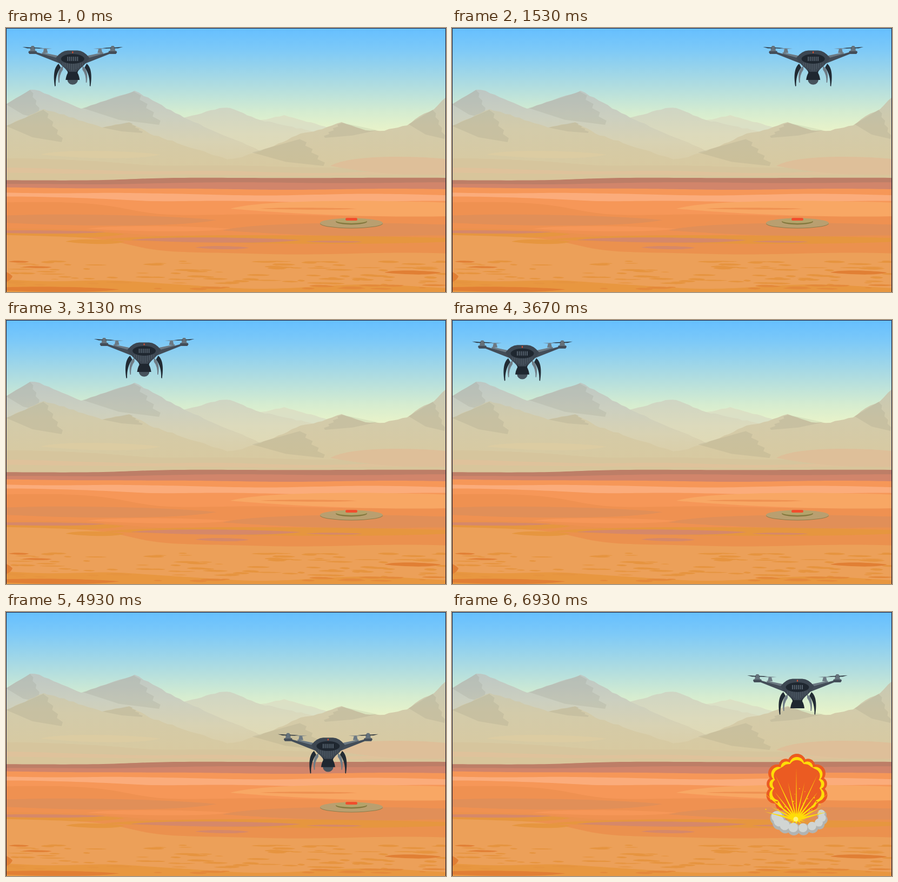
Recreate the animation shown at these times as an HTML page. Size 814 px wide and 488 px high, loop 8 s.

```html
<!DOCTYPE html>
<html lang="en">
<head>
<meta charset="utf-8">
<title>Drone over the desert</title>
<style>
html, body { margin: 0; width: 100%; height: 100%; overflow: hidden; }
svg { display: block; width: 814px; height: 488px; }
</style>
</head>
<body>
<svg viewBox="0 0 814 488">
  <defs>
    <linearGradient id="sky" gradientUnits="userSpaceOnUse" x1="0" y1="0" x2="0" y2="195">
      <stop offset="0" stop-color="#65bfff"/><stop offset=".2" stop-color="#7cc9f8"/>
      <stop offset=".5" stop-color="#a9dae3"/><stop offset=".8" stop-color="#d5ecd0"/>
      <stop offset="1" stop-color="#ecf4c8"/>
    </linearGradient>
    <linearGradient id="haze" gradientUnits="userSpaceOnUse" x1="0" y1="114" x2="0" y2="275">
      <stop offset="0" stop-color="#bdc7c4"/><stop offset=".3" stop-color="#cbcfc0"/>
      <stop offset=".6" stop-color="#d8d2b3"/><stop offset="1" stop-color="#dccb9f"/>
    </linearGradient>
    <linearGradient id="far" gradientUnits="userSpaceOnUse" x1="0" y1="147" x2="0" y2="245">
      <stop offset="0" stop-color="#ced5c4"/><stop offset=".5" stop-color="#dcdabc"/>
      <stop offset="1" stop-color="#e2d9b1"/>
    </linearGradient>
    <linearGradient id="near" gradientUnits="userSpaceOnUse" x1="0" y1="128" x2="0" y2="275">
      <stop offset="0" stop-color="#c6c8b4"/><stop offset=".4" stop-color="#d3cbaa"/>
      <stop offset="1" stop-color="#d9c99e"/>
    </linearGradient>
    <g id="side">
      <path fill="#6c7983" d="M-57 45 L-28 51 V56 L-56 48Z M-55 46 L-53 38 H-48 L-46 46Z M-62 38 L-51 37.4 L-38 38 L-51 39Z"/>
      <path fill="#6f7c86" d="M-18 70 Q-30 78 -26 101 L-24.5 101 Q-25 86 -18 77Z"/>
      <path fill="#434d58" d="M-81 42.5 H-67 L-66 45 L-30 55 L-20 67 L-68 48 H-80 L-82 45Z"/>
      <path fill="#64717b" d="M-79 43 L-78 36 L-76 33 H-72 L-70 36 L-69 43Z"/>
      <path fill="#29323b" d="M-93 35 L-77 36 V37.4 H-84Z M-71 36 L-55 37 L-62 38 L-71 37.4Z"/>
      <path fill="#222b34" d="M-26 66 C-35 73 -36 90 -33 108 L-31.5 107 C-32 94 -29 82 -22 73Z"/>
    </g>
  </defs>
  <g id="scene"></g>
  <g id="mine">
    <ellipse cx="639" cy="361.5" rx="58" ry="9" fill="#8b7c4c"/>
    <ellipse cx="639" cy="360.5" rx="58" ry="9" fill="#b99f70"/>
    <ellipse cx="639" cy="358" rx="29" ry="5.4" fill="#84783e"/>
    <ellipse cx="639" cy="356" rx="29" ry="5" fill="#b4a36a"/>
    <rect x="628" y="351" width="22" height="5" rx="2.5" fill="#f04e2d"/>
  </g>
  <g id="ball">
    <circle cy="95" r="9.8" fill="#46525c"/>
  </g>
  <g id="drone">
    <use href="#side"/><use href="#side" transform="scale(-1 1)"/>
    <path fill="#3c4651" d="M-31 55 Q-21 42 -9 41.5 H9 Q21 42 31 55 Q25 66 14 75 L8 82 H-8 L-14 75 Q-25 66 -31 55Z"/>
    <path id="ribs" stroke="#535f6a" fill="none"/>
    <ellipse cy="57" rx="21.5" ry="9" fill="#1f2730"/>
    <path id="grill" stroke="#54606c" stroke-width="2" fill="none"/>
    <path fill="#1f2730" d="M-10 77 L-7 81 H7 L10 77 L9 83 Q12 88 13 96 H-13 Q-12 88 -9 83Z"/>
    <rect x="-1" y="43.5" width="2" height="3" fill="#e5502f"/>
  </g>
  <g id="boom"></g>
  <path d="M.5 488 V.5 H813.5 V488" fill="none" stroke="#1c1730"/>
</svg>
<script>
const $ = id => document.getElementById(id);
const WIDTH = 814, HEIGHT = 488;

let seed = 7;
const random = () => (seed = seed * 16807 % 2147483647) / 2147483647;
const between = (a, b) => a + (b - a) * random();
const range = (n, make) => Array.from({ length: n }, (_, i) => make(i));

function draw(parent, tag, attrs) {
  const el = document.createElementNS('http://www.w3.org/2000/svg', tag);
  for (const name in attrs) el.setAttribute(name, attrs[name]);
  $(parent).append(el);
}
const poly = (parent, fill, points) => draw(parent, 'polygon', { fill, points: points.join(' ') });
const circle = (fill, cx, cy, r) => draw('boom', 'circle', { fill, cx, cy, r });

// Mountain range through a few peaks and saddles, with slightly rough slopes
function ridge(fill, ...peaks) {
  const points = [];
  peaks.slice(1).forEach(([x1, y1], i) => {
    const [x0, y0] = peaks[i], steps = Math.ceil((x1 - x0) / 9);
    for (let k = 0; k < steps; k++) {
      const s = k / steps, rough = k ? between(-1.2, 1.2) : 0;
      points.push([x0 + (x1 - x0) * s, y0 + (y1 - y0) * s + rough]);
    }
  });
  const end = peaks[peaks.length - 1];
  poly('scene', fill, [...points, end, [end[0], 280], [peaks[0][0], 280]]);
}

// Shaded face: one straight slope from the peak, one jagged edge on the other side
function face(x, y, w, h) {
  const edge = range(9, i => [x + w * (.5 * i / 8 + (i % 2 ? .06 : -.03)), y + 2 * h * i / 8]);
  poly('scene', 'rgba(115,115,100,.12)', [[x - w, y + h], [x, y], ...edge, [x - w * .3, y + h * 1.7]]);
}

// Ground from a wavy upper edge down; the edge changes level left of the middle
function layer(fill, left, right, wave = 1) {
  const phase = between(0, 6);
  const edge = range(83, i => {
    const x = i * 10, step = (1 + Math.tanh((x - 230) / 65)) / 2;
    return [x, left + (right - left) * step + wave * Math.sin(x / 62 + phase)];
  });
  poly('scene', fill, [...edge, [WIDTH + 6, HEIGHT], [0, HEIGHT]]);
}

// Flat patch tapering to both ends
const streak = (fill, x, y, w, h) => draw('scene', 'path', {
  fill, d: `M${x} ${y}c${w * .15} ${-h} ${w * .8} ${-h * .6} ${w} 0c${-w * .2} ${h} ${-w * .7} ${h * .6} ${-w} 0Z`
});

function drawMountains() {
  draw('scene', 'rect', { width: WIDTH, height: HEIGHT, fill: 'url(#sky)' });
  ridge('#dbe0c5', [440, 178], [515, 161], [590, 182], [660, 215]);
  ridge('url(#far)', [300, 176], [328, 166], [395, 148], [415, 148], [470, 170], [580, 194], [640, 230]);
  ridge('url(#haze)', [0, 141], [45, 114], [62, 116], [139, 149], [238, 116], [330, 166], [420, 205], [520, 250]);
  face(45, 114, 45, 27);
  face(238, 117, 96, 31);
  ridge('url(#near)', [0, 181], [70, 150], [90, 155], [178, 184], [228, 174], [265, 195], [410, 243], [450, 280]);
  face(70, 151, 70, 30);
  face(228, 174, 50, 10);
  ridge('url(#near)', [390, 246], [436, 239], [512, 211], [545, 195], [585, 187], [621, 174], [665, 189],
    [700, 190], [742, 180], [765, 163], [792, 150], [814, 128]);
  face(621, 175, -66, 14);
  face(790, 151, 45, 27);
  face(545, 205, 90, 25);
  streak('#dccca2', 65, 234, 220, 11);
  layer('#d6c59d', 243, 256, 2);
  layer('#dfc29b', 260, 266, 2);
  streak('#debf99', 600, 255, 300, 28);
  layer('#d8c59b', 268, 272);
}

function drawDesert() {
  const deep = '#ef9151', brown = '#e18f58', bright = '#f69758', ochre = '#e6963f', violet = '#d68869', rust = '#e17f34';
  layer('#bd7e67', 281.500, 277, .3);
  layer('#d1856b', 289, 286, .8);
  layer(bright, 295, 298);
  layer('#fbac7b', 304, 308, 1.5);
  layer(bright, 313, 321, 1.5);
  layer(deep, 323, 346, 1.5);
  streak('#f8a764', 415, 334, 560, 24);
  streak(deep, 470, 334, 180, 3);
  streak(brown, -90, 355, 480, 17);
  streak(brown, 400, 374, 600, 22);
  streak(bright, 150, 371, 265, 8);
  layer('#eb914e', 372, 385, 1.5);
  streak(ochre, -90, 381, 310, 11);
  streak(ochre, 180, 391, 700, 13);
  streak(violet, -60, 377, 245, 5);
  streak(violet, 230, 392, 315, 8);
  streak(violet, 350, 406, 100, 5);
  streak(violet, 555, 395, 105, 3);
  layer('#eca059', 384, 417, 1.5);
  streak(ochre, 110, 395, 110, 7);
  layer('#e89740', 464, 478, 4);

  for (let i = 0; i < 110; i++) {
    const depth = random();
    streak(depth > .85 ? '#e4893a' : '#e6943f', between(-20, 800), 431 + depth * 52, between(12, 55), between(1, 3.5));
  }
  streak(rust, -30, 459, 42, 18);
  streak(rust, -40, 483, 250, 8);
  streak(rust, 30, 442, 55, 3);
  streak(rust, 5, 432, 38, 3);
  streak(rust, 700, 452, 105, 6);
}

function drawExplosion() {
  const orange = '#eb5b22', yellow = '#ffdc08', cx = 638, cy = 322;
  const puffs = range(11, i => {
    const a = -Math.PI / 2 + (i - 5) * .49;
    return [cx + 44 * Math.cos(a), cy + 43 * Math.sin(a), (i % 2 ? 17 : 13) - Math.abs(i - 5) * .3];
  });
  // Nested rings drawn ever closer to the middle leave crescents
  for (const [fill, inward, size] of [[orange, 0, 1], [yellow, .06, .8], [orange, .2, .82]])
    for (const [x, y, r] of puffs) circle(fill, x + (cx - x) * inward, y + (cy - y) * inward, r * size);
  draw('boom', 'path', { fill: orange, d: 'M605 290Q638 268 671 290L676 345 654 376H622L601 345Z' });

  const smoke = range(9, i => {
    const a = Math.PI - i * .43;
    return [644 + 42 * Math.cos(a), 381 + 21 * Math.sin(a), 13.5 - i * .6];
  });
  for (const [x, y, r] of smoke) circle('#b2b4b2', x, y, r);
  for (const [x, y, r] of smoke) circle('#d1d5d3', x - 1, y - 3, r * .75);

  // Long thin rays upwards, short thick ones to the sides
  for (let i = -6; i <= 6; i++) {
    const a = i * .22, length = (i % 2 ? 72 : 96) * (.5 + .5 * Math.cos(a)), w = 1.2 + Math.abs(a);
    draw('boom', 'polygon', {
      fill: yellow, points: `${-w},0 0,${-length} ${w},0`,
      transform: `translate(637 384) rotate(${a * 180 / Math.PI})`
    });
  }
  for (let i = 0; i < 18; i++) {
    const a = between(-2.9, -.25), r = between(28, 62);
    circle(yellow, 637 + r * Math.cos(a), 382 + r * Math.sin(a), between(.6, 1.3));
  }
  poly('boom', yellow, range(24, i => {
    const a = i * Math.PI / 12, r = i % 2 ? 8 : 19;
    return [637 + r * Math.cos(a), 383 + r * .5 * Math.sin(a)];
  }));
  circle('#fff27a', 636, 383, 4.5);
}

const linear = u => u;
const easeIn = u => 1 - Math.cos(u * Math.PI / 2);
const left = [118, 0], right = [697, 0], low = [639, 208], high = [639, 82], ground = [639, 256.5];
const DROP = 5115;

const legs = [
  { from: left, to: right, start: -150, duration: 1735, ease: easeIn },
  { from: right, to: left, start: 1660, duration: 1735, ease: easeIn },
  { from: left, to: low, start: 3457, duration: 1555, ease: easeIn },
  { from: low, to: high, start: DROP, duration: 555, ease: linear }
];
const fall = { from: low, to: ground, start: DROP, duration: 485, ease: easeIn };

function along({ from, to, start, duration, ease }, t) {
  const share = ease(Math.min(1, Math.max(0, (t - start) / duration)));
  return from.map((v, i) => v + (to[i] - v) * share);
}

function render(time) {
  // Fifteen pictures a second, timed in hundredths
  const t = Math.round(Math.floor((time % 8000 + 3.4) * .015) * 20 / 3) * 10;
  const leg = legs.findLast(l => t >= l.start);
  const place = (id, [x, y]) => $(id).setAttribute('transform', `translate(${x} ${y})`);
  place('drone', along(leg, t));
  place('ball', along(t < DROP ? leg : fall, t));
  const exploded = t >= 6930;
  $('mine').style.display = $('ball').style.display = exploded ? 'none' : '';
  $('boom').style.opacity = exploded ? 1 : t >= 6870 ? .5 : 0;
}

drawMountains();
drawDesert();
drawExplosion();
$('grill').setAttribute('d', range(6, i => `M${i * 3.6 - 9} 53V61`).join(''));
$('ribs').setAttribute('d', range(10, i => i * 4 - 18).map(x => `M${x} 64V${80 - Math.abs(x) * .6}`).join(''));

const epoch = performance.now();
function tick() {
  render(performance.now() - epoch);
  requestAnimationFrame(tick);
}
tick();
</script>
</body>
</html>
```
